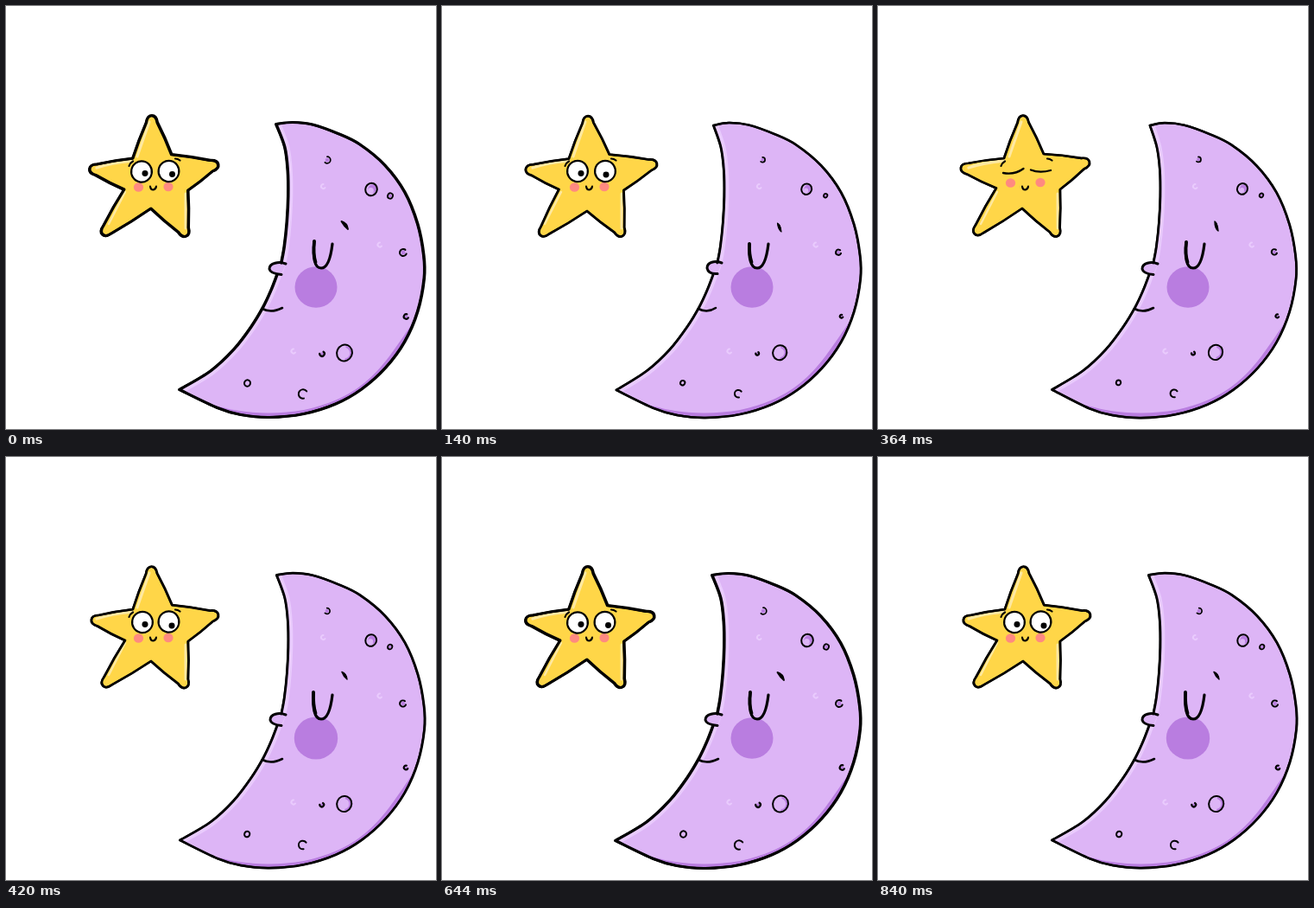
Animation of 498 by 489 pixels, one loop 980 ms. Source, as an HTML page with a canvas:

```html
<!DOCTYPE html>
<html lang="en">
<head>
<meta charset="utf-8">
<title>Star and moon</title>
<style>
  html, body { margin: 0; width: 100%; height: 100%; overflow: hidden; background: #fff; }
  canvas { display: block; width: 100vw; height: 100vh; }
</style>
</head>
<body>
<canvas id="stage" width="498" height="489"></canvas>
<script>
const ctx = document.getElementById('stage').getContext('2d');
const INK = '#000', LILAC = '#ddb5f6', PLUM = '#b97de0', PALE = '#e9cbfd';
const GOLD = '#ffd648', CREAM = '#ffe9a2', BLUSH = '#ff8a80';
const STEP = 140;
const ORDER = ['a', 'b', 'c', 'd', 'a', 'b', 'd'];

// tips and notches run clockwise from the top; eyes and pupils are x, y pairs
const POSES = {
  a: {
    tips: [169, 126.5, 246, 183, 209, 266, 112, 264, 97, 188],
    notches: [192, 171.5, 211, 213, 168, 234, 137, 212, 147, 176],
    eyes: [157, 191.5, 188.5, 191], pupils: [161, 193.5, 192.5, 194.5],
    line: 3.1, heavy: 0.7, top: [313, 136.5], low: [201, 443.5], outer: [0, 0],
    brow: [388.5, 249, 396, 258], browWidth: 3.4, nose: [305, 0], lash: [357, 272],
    cheek: 24.5, shrink: 0, shift: [0, 0], mouthEnd: 320
  },
  b: {
    tips: [169, 127, 249, 182, 209, 266, 114, 265, 97, 188.5],
    notches: [194, 171.5, 210.5, 213, 168, 237, 135.5, 212, 147, 176.5],
    eyes: [157, 191, 189, 191], pupils: [161, 193.5, 190, 195],
    line: 2.7, heavy: 0.4, top: [314.5, 138], low: [202, 444], outer: [0.3, 0.5],
    brow: [388.5, 251, 393, 261], browWidth: 2.2, nose: [307, -1], lash: [356, 275],
    cheek: 24.5, shrink: 0.9, shift: [-0.8, -0.3], mouthEnd: 317
  },
  c: {
    tips: [168, 126.5, 245, 180, 208, 266, 112, 263.5, 96, 187],
    notches: [192, 171, 211, 212, 167, 234, 137, 210.5, 146, 176],
    eyes: null,
    line: 2.7, heavy: 0.3, top: [315, 138], low: [201.5, 443.5], outer: [-0.3, 0.7],
    brow: [390, 249, 394, 260], browWidth: 2.6, nose: [306, 0], lash: [357, 273],
    cheek: 24.5, shrink: 0.8, shift: [-1, -0.6], mouthEnd: 319
  },
  d: {
    tips: [168.5, 126.5, 246, 182, 208.5, 266.5, 112.5, 264.5, 99, 188],
    notches: [192.5, 171, 211, 213, 168, 236, 138, 212, 147, 176],
    eyes: [158, 191, 188.5, 190.5], pupils: [161, 193.5, 192, 195],
    line: 2.7, heavy: 0.4, top: [313.5, 136.5], low: [201.5, 443], outer: [0.2, -0.3],
    brow: [389, 248.5, 395, 257], browWidth: 2.6, nose: [306, 0], lash: [356, 272],
    cheek: 25.2, shrink: 0.4, shift: [-0.3, 0], mouthEnd: 320
  }
};

const RIM = [245, 464.5, 272, 472.5, 305, 475.5, 345, 471.5, 382, 460, 412, 443, 440, 418,
  462, 388, 477, 353, 484.5, 315, 484, 288, 477, 252, 462, 215, 439, 184, 410, 160,
  386, 148, 355, 137, 332, 134.5];
const CHIN = [314, 311, 307, 329, 298, 348, 284, 371, 264, 397, 237, 422];
const BROW_EDGE = [323, 163, 326.5, 190, 327, 220, 325.5, 250, 322.5, 278, 319, 297];

// x, y, radius, arc start and end in turns, line width
const CRATERS = [
  [372, 178, 3.8, -0.25, 0.37, 1.7],
  [423, 212, 7, 0, 1, 2],
  [445, 219.5, 3.1, 0, 1, 1.8],
  [460, 285, 4, 0.06, 0.86, 2],
  [463.5, 359, 2.8, 0.08, 0.8, 2.1],
  [392, 401, 9.2, 0, 1, 2],
  [366, 402, 2.8, -0.15, 0.5, 2.3],
  [344, 448.5, 5.2, 0.22, 0.9, 2],
  [279.5, 436, 3.6, 0, 1, 2]
];
const GLINTS = [[367.5, 208.5], [433, 276], [333, 399]];

function addSpline(path, p) {
  const n = p.length / 2;
  const at = i => { const k = 2 * Math.max(0, Math.min(n - 1, i)); return [p[k], p[k + 1]]; };
  for (let i = 0; i < n - 1; i++) {
    const [a, b, c, d] = [at(i - 1), at(i), at(i + 1), at(i + 2)];
    path.bezierCurveTo(b[0] + (c[0] - a[0]) / 6, b[1] + (c[1] - a[1]) / 6,
      c[0] - (d[0] - b[0]) / 6, c[1] - (d[1] - b[1]) / 6, c[0], c[1]);
  }
}

function stroke(path, width, color = INK) {
  ctx.lineWidth = width;
  ctx.strokeStyle = color;
  ctx.stroke(typeof path === 'string' ? new Path2D(path) : path);
}

function fill(path, color) {
  ctx.fillStyle = color;
  ctx.fill(typeof path === 'string' ? new Path2D(path) : path);
}

function disc(x, y, rx, ry, color, tilt = 0) {
  ctx.beginPath();
  ctx.ellipse(x, y, rx, ry, tilt, 0, 2 * Math.PI);
  ctx.fillStyle = color;
  ctx.fill();
}

function arc(x, y, r, from, to, width, color = INK) {
  const path = new Path2D();
  path.arc(x, y, r, from * 2 * Math.PI, to * 2 * Math.PI);
  stroke(path, width, color);
}

function clipped(path, draw) {
  ctx.save();
  ctx.clip(path);
  draw();
  ctx.restore();
}

function starPath({ tips, notches }) {
  const path = new Path2D();
  const pair = (list, i) => { const k = (i + 5) % 5 * 2; return [list[k], list[k + 1]]; };
  path.moveTo(...pair(notches, 4));
  for (let i = 0; i < 5; i++) {
    const [x, y] = pair(tips, i), from = pair(notches, i - 1), to = pair(notches, i);
    const dx = x - (from[0] + to[0]) / 2, dy = y - (from[1] + to[1]) / 2;
    const len = Math.hypot(dx, dy), ux = dx / len, uy = dy / len;
    const side = (s, along) => [x - ux * along + uy * s, y - uy * along - ux * s];
    const left = side(6.4, 8), right = side(-6.4, 8);
    const bow = (p, q, s) => [(p[0] + q[0]) / 2 + uy * s, (p[1] + q[1]) / 2 - ux * s];
    path.quadraticCurveTo(...bow(from, left, 1.2), ...left);
    path.bezierCurveTo(...side(4.8, -2.6), ...side(-4.8, -2.6), ...right);
    path.quadraticCurveTo(...bow(right, to, -1.2), ...to);
  }
  path.closePath();
  return path;
}

function drawStar(pose) {
  const body = starPath(pose);
  fill(body, GOLD);
  clipped(body, () => {
    stroke('M152 174L166 134', 3, CREAM);
    stroke('M105 187Q122 181 146 179', 3.4, CREAM);
    stroke('M119 252L138 215', 2.4, CREAM);
    stroke('M208 217L208 257', 3, CREAM);
  });
  stroke(body, pose.line);
  ctx.save();
  ctx.translate(-pose.heavy, pose.heavy * 0.6);
  stroke(body, pose.line * 0.85);
  ctx.restore();

  const lift = pose.eyes ? 0 : 5;
  disc(153.5, 209.5 - lift, 5.6, 5.3, BLUSH);
  disc(188, 209 - lift, 5.6, 5.3, BLUSH);
  stroke('M142.5 185Q143.5 181.5 147 179.5', 2.2);
  stroke('M196 176.5Q199 176.5 201.5 178.5', 2.2);
  stroke('M167 208.5Q167.5 212.5 170.5 212.5Q173.5 212 174 208.5', 2.1);

  if (!pose.eyes) {
    stroke('M145 193Q158 195.5 168.5 188', 2.3);
    stroke('M177 189.5Q187 193.5 200 190', 2.3);
    return;
  }
  for (let i = 0; i < 4; i += 2) {
    const [x, y] = pose.eyes.slice(i);
    const eye = new Path2D();
    eye.ellipse(x, y, 11.9, 12.1, 0.2, 0, 2 * Math.PI);
    fill(eye, '#fff');
    stroke(eye, 2.2);
    disc(pose.pupils[i], pose.pupils[i + 1], 3.5, 3.4, INK);
  }
}

function drawCraters({ shrink, shift }) {
  CRATERS.forEach(([x, y, r, from, to, width], i) => {
    const cx = x + shift[0], cy = y + shift[1], size = r - shrink;
    if (i === 1) {
      disc(cx + 1, cy - 0.5, size - 2.3, size - 1.6, PLUM, 0.4);
      disc(cx - 0.5, cy + 1.5, size - 3.6, size - 3.4, LILAC);
    } else if (i === 5) {
      arc(cx, cy, size - 2, -0.2, 0.22, 2, PLUM);
    } else if (i !== 8) {
      disc(cx, cy, size * 0.6, size * 0.6, i === 7 ? LILAC : PLUM);
    }
    if (i === 8) disc(cx, cy, size - 1, size - 1, LILAC);
    if (to - from === 1) {
      const ring = new Path2D();
      ring.ellipse(cx, cy, size * 0.96, size * 1.04, 0.4, 0, 2 * Math.PI);
      stroke(ring, width);
    } else {
      arc(cx, cy, size, from, to, width);
    }
  });
  for (const [x, y] of GLINTS) arc(x, y, 2.5, 0.1, 0.75, 2, PALE);
}

function drawMoon(pose) {
  const { top, low, outer, brow, nose, lash } = pose;
  const rim = RIM.map((v, i) => v + outer[i % 2]);
  const edge = new Path2D('M314 311');
  addSpline(edge, [...CHIN, ...low]);
  addSpline(edge, [...low, ...rim, ...top]);
  addSpline(edge, [...top, ...BROW_EDGE]);

  const bump = new Path2D(`M324 ${298 + nose[1]}C316 ${295 + nose[1]} ${nose[0]} ${297 + nose[1]}
    ${nose[0]} ${304 + nose[1]}C${nose[0] + 1} ${309 + nose[1]} 313 310 319 ${310.5 + nose[1]}`);
  const inner = new Path2D(`M${low.join(' ')}`);
  addSpline(inner, [...low, 237, 422, 264, 397, 284, 371, 298, 348, 307, 329, 314, 311,
    ...BROW_EDGE.slice(-2), 322.5, 278, 325.5, 250, 327, 220, 326.5, 190, 323, 163, ...top]);
  const shade = new Path2D('M238 461');
  addSpline(shade, [238, 461, 270, 468, 305, 470.5, 345, 467, 382, 455.5, 412, 438, 440, 410, 474, 362]);
  shade.lineTo(498, 489);
  shade.lineTo(238, 489);

  fill(edge, LILAC);
  clipped(edge, () => {
    stroke(inner, 10.5, PALE);
    fill(shade, PLUM);
  });
  fill(bump, LILAC);
  stroke(edge, pose.line);
  ctx.save();
  ctx.translate(-pose.heavy, 0);
  stroke(edge, pose.line * 0.85);
  ctx.restore();
  stroke(bump, 3);

  disc(359, 325, pose.cheek, pose.cheek - 0.7, PLUM);
  stroke(`M${lash.join(' ')}C355 290 357 303 365 303C372 303 376 292 378 275`, 3.2);
  stroke(`M${lash.join(' ')}Q355.5 287 358.5 296`, 3.8);
  stroke(`M297 350Q307 355.5 ${pose.mouthEnd} 349`, 2.6);

  const [x0, y0, x1, y1] = brow;
  stroke(`M${x0} ${y0}Q${x1 - 1} ${y0 + 2} ${x1} ${y1}Q${x1 - 4} ${y1 - 3} ${x0} ${y0}Z`, pose.browWidth * 0.55);
  fill(`M${x0} ${y0}Q${x1} ${y0 + 1} ${x1} ${y1}Q${x1 - 4} ${y1 - 3} ${x0} ${y0}Z`, INK);
  drawCraters(pose);
}

let shown = null;
function frame() {
  const key = ORDER[Math.floor(performance.now() / STEP) % ORDER.length];
  if (key !== shown) {
    shown = key;
    ctx.fillStyle = '#fff';
    ctx.fillRect(0, 0, 498, 489);
    ctx.lineCap = ctx.lineJoin = 'round';
    drawMoon(POSES[key]);
    drawStar(POSES[key]);
  }
  requestAnimationFrame(frame);
}
frame();
</script>
</body>
</html>
```
